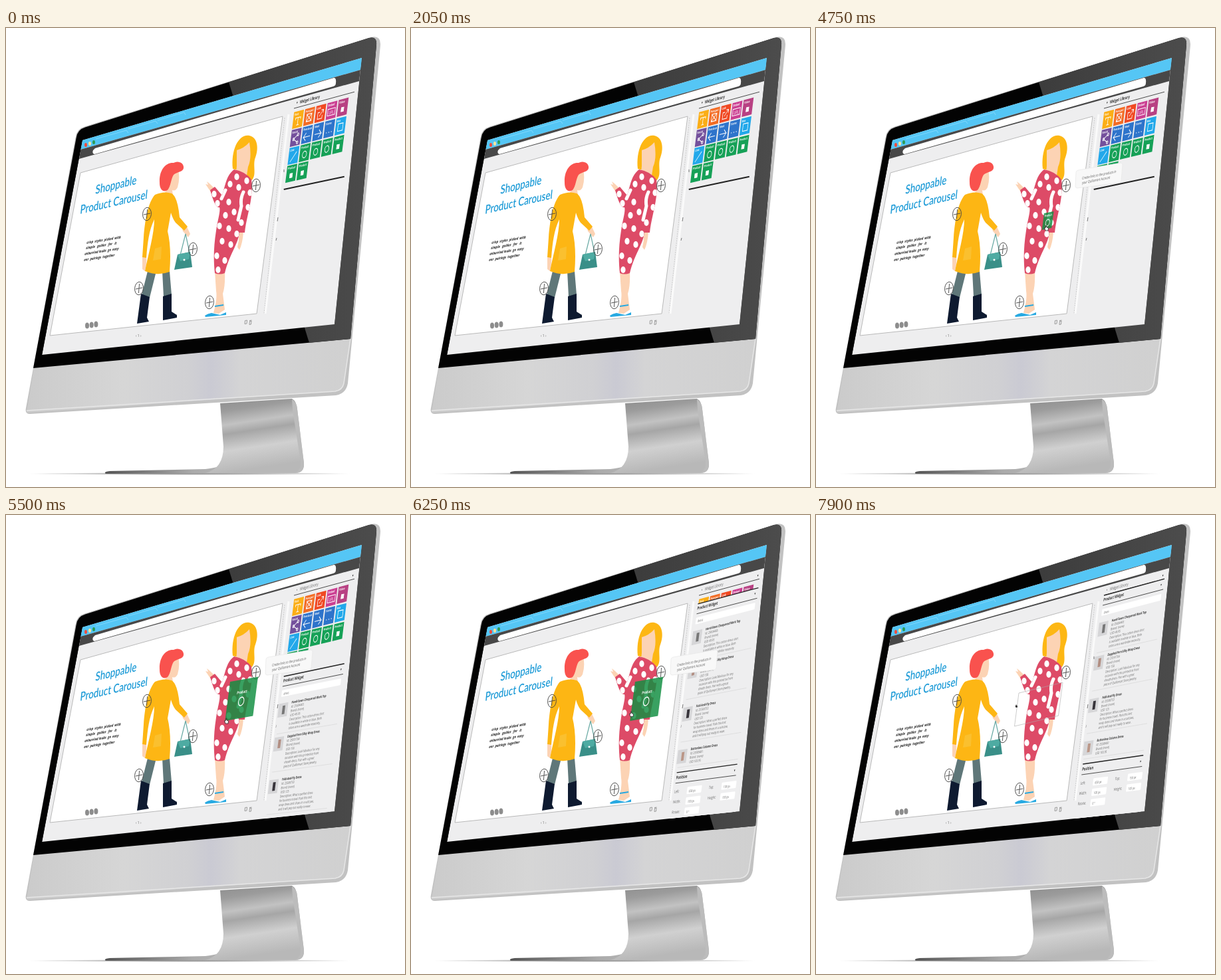
Write an HTML page that moves like this. It is 600 px wide and 691 px high and loops after 8 s.

```html
<!DOCTYPE html>
<html lang="en">
<head>
<meta charset="utf-8">
<title>Shoppable carousel editor</title>
<style>
html, body { margin: 0; width: 100%; height: 100%; overflow: hidden; background: #fff; }
svg { display: block; width: 600px; height: 691px; font-family: "Open Sans", Arial, sans-serif; }
.headline { font: 600 18.5px Lato, Arial, sans-serif; fill: #1d9bd7; }
.blurb { font: italic 800 5.6px "Open Sans", sans-serif; fill: #3a3a3a; }
.bold { font-weight: 700; fill: #333; }
</style>
</head>
<body>
<svg viewBox="0 0 600 691">
  <defs>
    <linearGradient id="chin" x1="0" x2="1">
      <stop offset="0" stop-color="#cbcbcb"/><stop offset=".3" stop-color="#d6d6d6"/>
      <stop offset=".5" stop-color="#d0d0d3"/><stop offset=".57" stop-color="#cacad3"/>
      <stop offset=".66" stop-color="#d4d4d5"/><stop offset="1" stop-color="#d0d0d0"/>
    </linearGradient>
    <linearGradient id="neck" x1="0" y1="0" x2=".2" y2="1">
      <stop offset="0" stop-color="#8a8a8a"/><stop offset=".2" stop-color="#9c9c9c"/>
      <stop offset=".38" stop-color="#c2c2c2"/><stop offset=".5" stop-color="#a6a6a6"/>
      <stop offset=".72" stop-color="#d0d0d0"/><stop offset="1" stop-color="#b8b8b8"/>
    </linearGradient>
    <linearGradient id="foot" x1="0" x2="1">
      <stop offset="0" stop-color="#555"/><stop offset=".45" stop-color="#aaa"/><stop offset="1" stop-color="#ccc"/>
    </linearGradient>
    <linearGradient id="shine" x1="0" x2="1">
      <stop offset="0" stop-color="#3c3c3c"/><stop offset="1" stop-color="#4c4c4c"/>
    </linearGradient>
    <radialGradient id="shadow"><stop offset="0" stop-color="#777"/><stop offset="1" stop-color="#fff"/></radialGradient>
    <clipPath id="screen"><path d="M115 169L535 45L494 446L54 492Z"/></clipPath>
    <clipPath id="dress"><use href="#dressShape"/></clipPath>
  </defs>

  <!-- Stand and monitor -->
  <ellipse cx="276" cy="671" rx="250" ry="2" fill="url(#shadow)"/>
  <path d="M150 671Q146 668 156 667L300 664Q330 660 340 650L440 655L436 670Z" fill="url(#foot)"/>
  <path d="M322 565L430 558Q437 562 438 574L448 655Q449 669 436 670L300 670Q327 663 327 630Z" fill="url(#neck)"/>
  <path d="M430 559Q437 563 438 574L448 655Q449 669 436 670Q444 663 443 653L431 575Z" fill="#bcbcbc"/>
  <path d="M118 148.500L548 14Q564 10 563 26L514 535Q511 551 496 553L36 581Q28 581 30 572L104.500 165Q106 152 118 148.500Z" fill="#c2c2c2"/>
  <path d="M518 468L508 535Q506 545 495 547L31 579L42 511Z" fill="url(#chin)"/>
  <path d="M518 468L508 535Q506 545 495 547L31 576" fill="none" stroke="#e6e6e6" stroke-width="1.500"/>
  <path d="M119 149.500L546 15Q558 12 557 25L518 468L41 512L105.500 166Q107 153 119 149.500Z" fill="#030303"/>
  <path d="M335 81.500L546 15Q558 12 557 25L518 468L456 474Z" fill="url(#shine)"/>

  <g clip-path="url(#screen)">
    <path d="M115 168L535 44L494 447L54 493Z" fill="#eeeeef"/>
    <path d="M115 168L536 44L533 63L112 183Z" fill="#55c6f5"/>
    <path d="M112 183L533 63L531 80L110 197Z" fill="#484848"/>
    <path d="M134 181L493 75Q497 75 496 83Q496 87 492 88L133 190Q129 189 131 184Z" fill="#fff"/>
    <path d="M135 167L181 154l3 4M184 152L225 140l3 4M228 139L268 127l2 4" fill="none" stroke="#8bdcff" stroke-width=".8"/>
    <g><ellipse cx="120" cy="176" rx="2" ry="3" fill="#ed4c3d"/><ellipse cx="126" cy="174" rx="2" ry="3" fill="#f8e6a0"/><ellipse cx="132" cy="172" rx="2" ry="3" fill="#2b9c54"/></g>

    <!-- Page canvas -->
    <path d="M112 218L416 133L377 430L66 463Z" fill="#fff" stroke="#b9b9b9"/>
    <path d="M419 135L388 430" stroke="#bbb" stroke-width=".7" stroke-dasharray="2 1.5"/>
    <path d="M425 130L390 430" stroke="#fafafa" stroke-width="3"/>
    <path d="M418 213v4M409 285l-1 6M407 316l-1 4" stroke="#777"/>
    <text class="headline" transform="matrix(.72 -.175 -.1 1 134 250)">Shoppable</text>
    <text class="headline" transform="matrix(.72 -.165 -.1 1 111 280)">Product Carousel</text>
    <g id="blurb" class="blurb"></g>
    <g fill="#8d8d8d"><ellipse cx="122" cy="448" rx="3" ry="4.600"/><ellipse cx="128.700" cy="447" rx="3" ry="4.600"/><ellipse cx="135.400" cy="446" rx="3" ry="4.600"/></g>
    <text x="195" y="465" font-size="5" fill="#666">‹ 1 ›</text>
    <path d="M359.500 440.500l3-.5-.5 5-3 .5zM366 440.500l3.500-.5M366.500 441.500l2.500-.5-.5 5-2.500.5z" fill="none" stroke="#888" stroke-width=".8"/>

    <!-- Woman in yellow -->
    <path d="M205 343h6q1 13-2 23l-4-3zM264 299l7-2 6 13-3 5-8-9zM247 217l12-4q3 14-1 27-3 6-8 4l1 8-13 1z" fill="#fcd3b4"/>
    <path d="M213 366h13l-10 40-12-4zM235 366h11l3 36-12 3z" fill="#5f7779"/>
    <path d="M203 400l13 5-4 31 3 6-18 3 2-15zM236 404l13-4v27l8 5v4l-21 4z" fill="#0e1a30"/>
    <path d="M224 251C214 262 209 288 207 315L205 345L211 346C213 322 215 305 223 288C223 310 214 340 209 366Q228 374 246 367Q249 330 243 306L248 278Q251 288 255 293L268 305L273 299L261 285Q258 254 249 249Q238 245 224 251Z" fill="#fdb614"/>
    <path d="M224 332l10-3-1 19-12 2z" fill="#fac02f"/>
    <path d="M231 233C230 214 240 202 252 203C260 199 268 204 267 211C266 217 258 216 252 221C248 227 248 238 243 244C236 248 231 243 231 233Z" fill="#f9524e"/>
    <path d="M262 342L270 310L276 338" fill="none" stroke="#69aaa4" stroke-width="1.200"/>
    <path d="M258 341L277 337L280 360L253 364Z" fill="#398f88"/><path d="M258 341L277 337L275 348L262 351Z" fill="#4eaba2"/><circle cx="268" cy="349" r="1.500" fill="#fff"/>

    <!-- Woman in the dotted dress -->
    <path d="M341 212C338 183 350 159 366 162C379 165 380 182 375 195C370 207 379 224 367 231L356 216Z" fill="#fdb714"/>
    <path d="M347 184Q358 181 366 172Q370 196 364 209L362 222L346 217L347 208ZM313 241l-5 6-8-12 4 1-2-5 5 4zM350 306h7q-1 18-6 28l-3-4q3-12 2-24zM314 366h15q1 22-3 34l3 24-9 6-8-1q6-22 4-33z" fill="#fcd3b4"/>
    <path id="dressShape" d="M343 213C331 222 330 237 325 252L314 239L307 244C311 258 315 271 321 270C323 275 318 290 316 305C312 330 312 350 314 369Q321 372 329 369C336 340 349 326 351 308L359 308C361 285 373 255 369 228Q360 216 343 213Z" fill="#dd4b67"/>
    <g id="dots" clip-path="url(#dress)" fill="#fff"></g>
    <path d="M299 433Q303 430 309 429L322 432L331 428V432L300 435Z" fill="#27a9e1"/>
    <path d="M314 419l13-2" stroke="#27a9e1" stroke-width="2"/>
    <g id="hotspots" fill="none" stroke="#444" stroke-width=".9"></g>

    <g id="panel"></g>
    <g id="overlay"></g>
  </g>
</svg>

<script>
const STEP = 150, LOOP = 8000;
const GREEN = '#16a157';
const el = id => document.getElementById(id);

// Sidebar perspective: u runs right, v runs down its left edge.
const slope = v => .293 - (v - 80) * .0005;
const point = (u, v) => [433 - (v - 121) * .125 + u, v - u * slope(v)];
const plane = (u, v) => `matrix(.62 ${-.62 * slope(v)} -.125 1 ${point(u, v)})`;
const quad = (u0, v0, u1, v1, fill) =>
  `<path d="M${point(u0, v0)}L${point(u1, v0)}L${point(u1, v1)}L${point(u0, v1)}Z" fill="${fill}"/>`;
const rule = (v, width, color = '#222') =>
  `<path d="M${point(0, v)}L${point(91, v)}" stroke="${color}" stroke-width="${width}"/>`;
const label = (u, v, text, size = 5.3, cls = '') =>
  `<text transform="${plane(u, v)}" font-size="${size}" fill="#666" class="${cls}">${text}</text>`;
const field = (u, v, w, h, text) =>
  `<rect transform="${plane(u, v)}" width="${w / .62}" height="${h}" rx="1.500" fill="#fff"/>` + label(u + 3, v + h - 2.5, text);

// Icons live in a box of 24 by 25.
const BOX = 'M6 9h12v11H6z';
const RING = '<circle cx="12" cy="15.500" r="5"/>';
const SQUARE = '<path d="M9 13h6v6H9z" fill="#fff"/>';
const path = d => `<path d="${d}"/>`;
const TILES = [
  ['#fbae17', 'Text', path('M6 13v-3h12v3M12 10v11M9 21h6')],
  ['#f36c24', 'Hotspot', path(BOX + 'l12 11M18 9L6 20')],
  ['#f04923', 'Link', path('M11 11H6v10h11v-5M10 17l9-9M14 8h5v5')],
  ['#cb3f92', 'Embed', path('M3 10h18v10H3z') + '<text x="6" y="18" font-size="6.500" fill="#fff" stroke="none">URL</text>'],
  ['#b84183', 'Video', SQUARE],
  ['#74509c', 'Social', path('M17 9L7 15l10 6') + '<circle cx="7" cy="15" r="2"/><circle cx="17" cy="9" r="2"/><circle cx="17" cy="21" r="2"/>'],
  ['#2e74cb', 'Previous', path('M20 16H4l6-6M4 16l6 6')],
  ['#2e74cb', 'Next', path('M4 16h16l-6-6M20 16l-6 6')],
  ['#2e74cb', 'Scene', path('M5 18h2M11 18h2M17 18h2')],
  ['#22a8ea', 'Box', path(BOX)],
  ['#22a8ea', 'Line', path('M5 22L19 8')],
  ...[RING, RING, RING, SQUARE, SQUARE, SQUARE].map(icon => [GREEN, 'Product', icon])
];
const tileContent = (name, icon) =>
  `<text x="2" y="6" font-size="4.800" font-weight="700" fill="#fff">${name}</text><g fill="none" stroke="#fff" stroke-width="1.200">${icon}</g>`;
const tiles = TILES.map(([color, name, icon], i) =>
  `<g transform="${plane(1 + i % 5 * 16.8, 127 + Math.floor(i / 5) * 27)}"><path d="M0 0h24v25.500H0z" fill="${color}"/>${tileContent(name, icon)}</g>`).join('');

const PRODUCTS = [
  [165, '#777', 'Hand-Sewn Chequered Work Top', '25604465', 'USD 49.95', 'Description: This cotton dress shirt', 'is available in white or blue. Both', 'colors are a wardrobe necessity.'],
  [216, '#b28f83', 'Dappled Fern Silky Wrap Dress', '25591704', 'USD 158', 'Description: Look fabulous for any', 'occasion with this printed tie front', 'sheath dress. Pair with a great', 'piece of Quillomart Store jewelry.'],
  [280, '#38353b', 'Fold-And-Fly Dress', '25589753', 'USD 125', 'Description: What a perfect dress', 'for business travel. Pack this knit', 'wrap dress and shoes in a suitcase,', 'and it will pop out ready to wear.'],
  [344, '#bb9788', 'Buttonless Column Dress', '25589481', 'USD 103.95']
];

function product([v, color, title, id, price, ...description], shift) {
  const lines = [title, 'Id: ' + id, 'Brand: (none)', price, ...description];
  const top = v + shift;
  return quad(-2, top - 3, 12, top + 18, '#d6d6d8') + quad(4, top + 1, 8, top + 14, color) +
    lines.map((line, i) => label(17, top + i * 6.4, line, 5.2, i ? '' : 'bold')).join('') +
    rule(top + lines.length * 6.4 - 2, .5, '#ccc');
}

function productPanel(top) {
  const shift = top - 121, base = top + 254;
  return quad(-2, top, 97, 520, '#eeeeef') + rule(top, 1.3) + label(0, top + 9, 'Product Widget', 6.5, 'bold') +
    label(86, top + 9, '▾', 5, 'bold') + rule(top + 15, .8) + field(0, top + 21, 89, 10, 'dress') +
    PRODUCTS.map(p => product(p, shift)).join('') +
    quad(-2, base, 97, 530, '#eeeeef') + rule(base, 1.3) + label(0, base + 10, 'Position', 6.7, 'bold') +
    label(87, base + 10, '▾', 5, 'bold') + rule(base + 16, .8) +
    [['Left:', '658 px', 'Top:', '158 px'], ['Width:', '100 px', 'Height:', '100 px'], ['Rotate:', '0 °']].map((row, i) => {
      const v = base + 31 + i * 15.5;
      return row.map((text, j) => j % 2 ? field(j * 26 - 7, v - 7, 22, 11, text) : label(j * 26, v, text, 6)).join('');
    }).join('');
}

// Interpolates every column of time-stamped rows with a soft ease.
function track(t, keys) {
  if (t <= keys[0][0]) return keys[0].slice(1);
  const next = keys.findIndex(k => k[0] > t);
  if (next < 0) return keys.at(-1).slice(1);
  const a = keys[next - 1], b = keys[next], p = (t - a[0]) / (b[0] - a[0]), e = p * p * (3 - 2 * p);
  return a.slice(1).map((value, i) => value + (b[i + 1] - value) * e);
}

const TILE_PATH = [
  [3550, 443, 177, 14.5, 25, .25, 1], [4600, 343, 279, 14.5, 25, .2, 1], [4750, 343, 279, 14.5, 25, .2, 1],
  [5500, 337, 251, 42, 59, .18, 1], [7150, 337, 251, 42, 59, .18, 1], [7750, 305, 268, 66, 50, .24, 0]
];
const CURSOR_PATH = [
  [2500, 400, 310], [3400, 447, 199], [3550, 447, 199], [4600, 346, 300], [4750, 346, 300],
  [5500, 331, 309], [6550, 331, 296], [6850, 331, 278], [7150, 331, 278], [7900, 301, 287]
];

function draggedTile(t) {
  const [x, y, w, h, s, alpha] = track(t, TILE_PATH);
  const place = (px, py, pw, ph) => `matrix(${pw / 24} ${-pw * s / 24} ${-.13 * ph / 25} ${ph / 25} ${px} ${py})`;
  const cw = 14.5 + (w - 14.5) * .2, ch = 25 + (h - 25) * .2;
  const left = (w - cw) / 2, top = (h - ch) / 2;
  return `<path transform="${place(x, y, w, h)}" d="M0 0h24v25H0z" fill="#128f41" fill-opacity="${.83 * alpha}"
    stroke="${alpha < 1 ? '#aaa' : 'none'}" stroke-width=".6" vector-effect="non-scaling-stroke"/>
    <g opacity="${alpha}" transform="${place(x + left - .13 * top, y + top - left * s, cw, ch)}">${tileContent('Product', RING)}</g>`;
}

const tooltip = `<path d="M394 214L458 203Q461 203 461 206L459 230Q459 232 456 233L393 241Q390 241 390 238L391 217Q391 215 394 214Z" fill="#f8f8f8" stroke="#e4e4e4" stroke-width=".6"/>
  <g font-size="5.600" fill="#555"><text transform="matrix(.66 -.13 -.1 1 400 228)">Create links to the products in</text>
  <text transform="matrix(.66 -.13 -.1 1 400 235)">your Quillomart Account</text></g>`;

function cursor(t) {
  const [x, y] = track(t, CURSOR_PATH);
  const resizing = t >= 6700;
  return `<path transform="translate(${x} ${y}) scale(${resizing ? .5 : 1})" d="M0-3l1 3 2.500 1-.5 4h-4l-1.500-4 1.500 0z"
    fill="${resizing ? '#222' : '#fff'}" stroke="#222" stroke-width=".8"/>`;
}

function render(t) {
  const open = t >= 5500;
  const rest = 1 - Math.min(1, Math.max(0, (t - 5500) / 1050));
  el('panel').innerHTML = label(3, 115, open ? '›' : '▾', 5, 'bold') + label(8, 116, 'Widget Library', 6.6, open ? '' : 'bold') +
    rule(121, .8) + tiles + (open ? productPanel(121 + 122 * rest ** 1.8) + label(87, 117, '▾', 5, 'bold') : rule(243, 2));
  el('overlay').innerHTML = (t >= 3550 && t < 6400 ? tooltip : '') + (t >= 3700 ? draggedTile(t) : '') + (t >= 2500 ? cursor(t) : '');
}

// Static repeated parts
el('blurb').innerHTML = [[121, 325, 'crisp  styles  picked  with'], [120, 333, 'simple   guides   for   it'],
  [118, 342, 'unhurried looks  go  easy'], [117, 351, 'our  pairings  together']]
  .map(([x, y, text]) => `<text xml:space="preserve" transform="matrix(.75 -.12 -.13 1 ${x} ${y})">${text}</text>`).join('');
el('dots').innerHTML = [[347, 224], [337, 235], [362, 230], [350, 240], [313, 250], [367, 248],
  [318, 264], [335, 262], [330, 282], [343, 277], [364, 270], [354, 293], [321, 298], [335, 302],
  [347, 310], [325, 321], [338, 326], [317, 343], [329, 350], [319, 364]]
  .map(([x, y]) => `<ellipse cx="${x}" cy="${y}" rx="3.600" ry="5"/>`).join('') +
  '<path d="M357 247Q352 257 354 268L349 289M324 257L330 244" fill="none" stroke="#fff" stroke-width="5" stroke-linecap="round"/>';
el('hotspots').innerHTML = [[212, 280], [376, 237], [281, 333], [200, 392], [306, 413]]
  .map(([x, y]) => `<g transform="translate(${x} ${y})"><ellipse rx="6.400" ry="9.800" transform="rotate(5)"/><path d="M-5 1L5-1M.6-7L-.6 7"/></g>`).join('');

let shown = null;
function frame(now) {
  const t = now % LOOP;
  const stepped = 1000 + Math.floor((t - 1000) / STEP) * STEP;
  if (stepped !== shown) render(shown = stepped);
  requestAnimationFrame(frame);
}
render(0);
requestAnimationFrame(frame);
</script>
</body>
</html>
```
